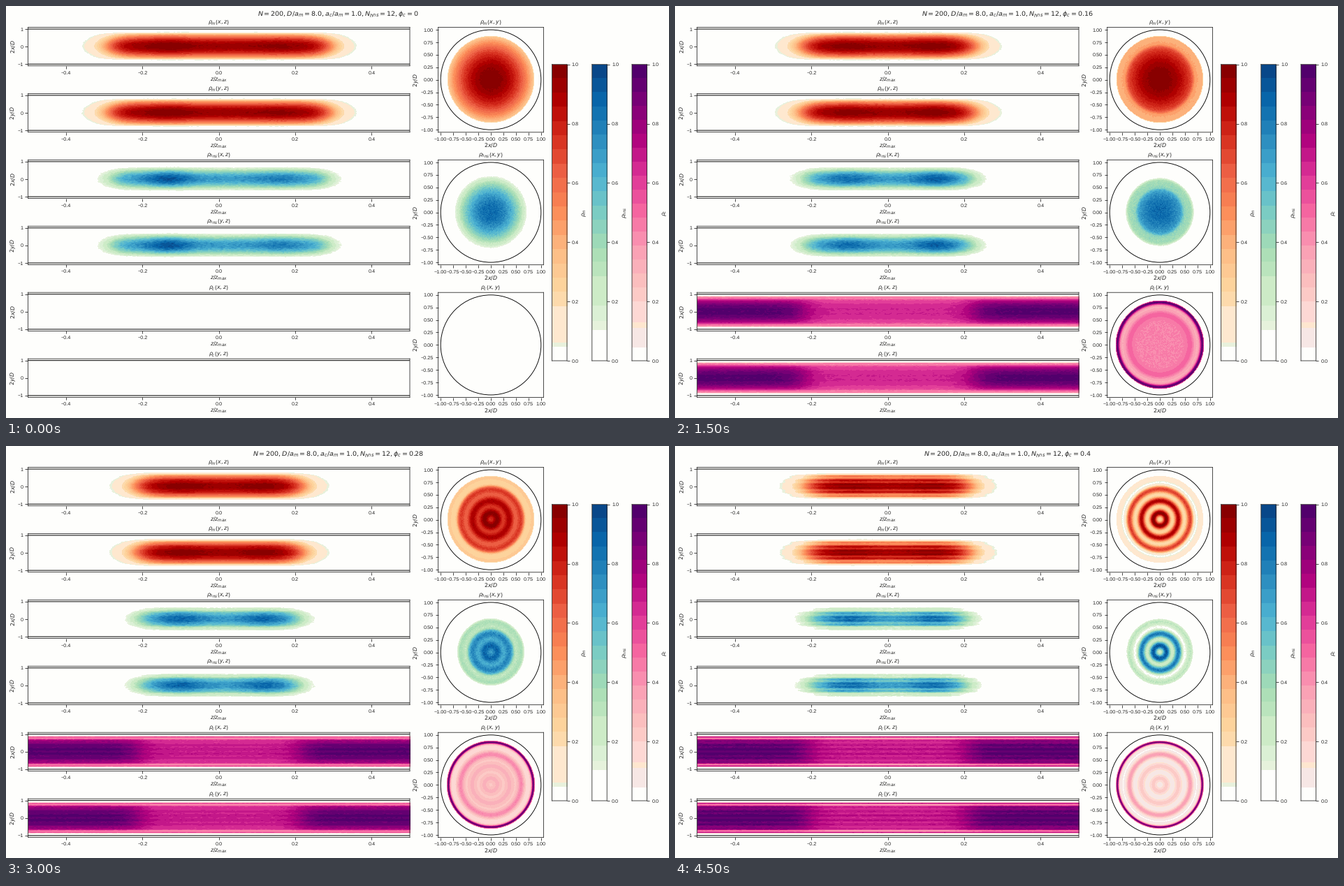
A matplotlib script that plays this animation: 949x590 px, repeating every 5000 ms.

```python
import numpy as np
import matplotlib as mpl
import matplotlib.pyplot as plt
from matplotlib.animation import FuncAnimation
from matplotlib.colors import ListedColormap

W, H, DPI = 949, 590, 64
PT = 59.3 / DPI          # keeps text and strokes in proportion to the stage
PAPER, INK = "#fefefc", "0.15"
STEPS = 10
SPECIES = ["m", "hns", "c"]

plt.rcParams.update({
    "font.family": "Liberation Sans", "mathtext.fontset": "dejavusans",
    "text.hinting": "none", "path.snap": False,
    "font.size": 9.6 * PT, "axes.labelsize": 9.6 * PT, "axes.titlesize": 9.6 * PT,
    "xtick.labelsize": 8.8 * PT, "ytick.labelsize": 8.8 * PT,
    "axes.linewidth": PT, "xtick.major.width": PT, "ytick.major.width": PT,
    "xtick.major.size": 4.8 * PT, "ytick.major.size": 4.8 * PT,
    "xtick.major.pad": 3.5 * PT, "ytick.major.pad": 3.5 * PT,
    "axes.labelpad": 0.5 * PT, "axes.titlepad": 6 * PT,
    "text.color": INK, "axes.labelcolor": INK, "xtick.color": INK,
    "ytick.color": INK, "axes.edgecolor": INK,
    "figure.facecolor": PAPER, "axes.facecolor": PAPER,
})


def banded(name, low, n):
    """Stepped colormap: a few given low bands, then n even bands up to 1."""
    base = mpl.colormaps[name]
    edges = np.linspace(low[-1][0], 1, n + 1)
    tops = [e for e, _ in low] + list(edges[1:])
    cols = [c for _, c in low] + [base(v) for v in (edges[1:] + edges[:-1]) / 2]
    v = (np.arange(1000) + 0.5) / 1000
    return ListedColormap([cols[i] for i in np.searchsorted(tops, v)])


CMAPS = {
    "m": banded("OrRd", [(0.047, PAPER), (0.061, "#e8f1dc"), (0.184, "#fee8cf")], 17),
    "hns": banded("GnBu", [(0.104, PAPER), (0.134, "#e6f2dc"), (0.185, "#dbf0d5"),
                           (0.285, "#cdebc7")], 15),
    "c": banded("RdPu", [(0.044, PAPER), (0.11, "#f7e7e5"), (0.13, "#fee6cf"),
                         (0.2, "#fdd8d4")], 17),
}


def centers(n, lim):
    return (np.arange(n) + 0.5) / n * 2 * lim - lim


AX = centers(140, 1)
RR = np.hypot(AX[:, None], AX[None, :])
Z = centers(200, 0.5)[None, :]
X = centers(56, 1)[:, None]


def bump(v, mid, width):
    return np.exp(-((v - mid) / width) ** 2)


def sigmoid(v):
    return 1 / (1 + np.exp(-np.clip(v, -40, 40)))


def mix(a, b, t):
    return a + (b - a) * t


def ramp(v, lo, hi):
    return np.clip((v - lo) / (hi - lo), 0, 1)


def crowding(k):
    return 0.04 * (k + 1) if k else 0


def half_length(phi):
    return 0.222 + 0.075 * np.exp(-phi / 0.09)


def layers(r, phi):
    """Concentric layers, 0.24 apart, that deepen with crowding."""
    depth = 0.6 * ramp(phi, 0.2, 0.4) ** 1.7
    return (1 + depth * np.cos(2 * np.pi * (r - 0.13) / 0.24)) / (1 + depth)


def radial(kind, phi):
    """Mean density in the x-y plane: a dome that turns into steps and layers."""
    r, order, late = RR, ramp(phi, 0, 0.2), ramp(phi, 0.2, 0.4)
    if kind == "m":
        step = sigmoid((r - 0.67) / 0.015)
        stepped = mix(1 - 0.75 * r ** 2, mix(0.41, 0.16, late), step)
        return mix(1 - 0.95 * r ** 2, stepped, order) * layers(r, phi) * (r < 0.86)
    if kind == "hns":
        dome = np.clip(1 - (r / 0.76) ** 2, 0, 1)
        step = sigmoid((r - 0.46) / 0.015)
        stepped = mix(1 - 1.1 * r ** 2, mix(0.46, 0.32, late), step)
        stepped = stepped * sigmoid((0.66 - r) / 0.012)
        return mix(0.87, 0.95, late) * mix(dome, stepped, order) * layers(r, phi)
    if phi == 0:
        return np.zeros_like(r)
    f = 0.88 * np.exp(-4.4 * phi) + 0.11 * order * bump(r, 0.6, 0.06)
    f = f * (1 - 0.3 * order * sigmoid((r - 0.68) / 0.02))
    f = f * mix(1, 1.5, late) * layers(r, phi)
    width = 0.022 + 0.07 * np.exp(-phi / 0.13)
    return mix(f, 0.97, bump(r, 0.845, width)) * (r < 0.875)


def along(kind, k, plane):
    """Mean density in a plane that holds the z axis."""
    phi, ax = crowding(k), np.abs(X)
    half = half_length(phi)
    if kind == "c":
        if phi == 0:
            return np.zeros((X.size, Z.size))
        packed = ramp(phi, 0.08, 0.4)
        chord = np.sqrt(np.clip(1 - (ax / 0.87) ** 2, 0, None))
        ends = chord ** mix(1, 0.5, packed)
        mid = 0.72 - 0.13 * np.exp((0.08 - phi) / 0.06)
        mid = mid * chord ** mix(0.5, 0.2, packed)
        inside = sigmoid((half - 0.01 - np.abs(Z) - 0.03 * X ** 2) / 0.02)
        f = mix(ends, mid, inside)
        f = f * (1 + 0.05 * packed * np.cos(2 * np.pi * (ax - 0.13) / 0.24))
        f = f + packed * (0.22 * bump(ax, 0.835, 0.03) - 0.28 * bump(ax, 0.73, 0.045))
        return 0.97 * f * (ax < 0.87)
    # Two dense spots whose balance swings and settles.
    skew = 0.4 * np.cos(1.2 * k) * np.exp(-k / 3)
    spots = ((1 + skew) * bump(Z, -0.45 * half, 0.06)
             + (1 - skew) * bump(Z, 0.53 * half, 0.06))
    line = plane.sum(axis=0)
    prof = np.interp(X, AX, line / line.max())
    if kind == "m":
        t = ramp(ax, 0.84, 0.65)
        ends = sigmoid((half - np.abs(Z) - 0.05 * X ** 2) / 0.021)
        return prof * t * t * (3 - 2 * t) * ends * (0.94 + 0.05 * spots)
    ends = sigmoid((half - 0.01 - np.abs(Z) - 0.05 * X ** 2) / 0.018)
    return prof * ends * (0.7 + 0.18 * spots)


GRAIN = {"m": (0.014, 0.013), "hns": (0.042, 0.04), "c": (0.005, 0.014)}


def grainy(f, size, rng):
    return np.clip(f + size * np.sqrt(np.clip(f, 0, 1)) * rng.standard_normal(f.shape), 0, 1)


def fields(k):
    out = []
    for s, kind in enumerate(SPECIES):
        rng = np.random.default_rng(100 * k + s)
        plane = radial(kind, crowding(k))
        side = along(kind, k, plane)
        flat, deep = GRAIN[kind]
        out += [grainy(side, deep, rng), grainy(side, deep, rng), grainy(plane, flat, rng)]
    return out


fig = plt.figure(figsize=(W / DPI, H / DPI), dpi=DPI)


def box(x0, y0, x1, y1):
    return fig.add_axes([x0 / W, 1 - y1 / H, (x1 - x0) / W, (y1 - y0) / H])


def picture(ax, kind, shape, extent):
    return ax.imshow(np.zeros(shape), extent=extent, origin="lower", aspect="auto",
                     cmap=CMAPS[kind], vmin=0, vmax=1, interpolation="bilinear",
                     interpolation_stage="data")


def side_panel(kind, row, axis):
    top = 30.5 + 94.93 * row
    ax = box(31.5, top, 578, top + 55.2)
    im = picture(ax, kind, (X.size, Z.size), (-0.5, 0.5, -1, 1))
    for y in (-1, 1):
        ax.axhline(y, color="black", lw=1.2 * PT)
    ax.set(xlim=(-0.5, 0.5), ylim=(-1.1, 1.1), yticks=[-1, 0, 1],
           xticks=[-0.4, -0.2, 0, 0.2, 0.4], xlabel=r"$z/z_{max}$",
           ylabel=rf"$2{axis}/D$", title=rf"$\rho_{{{kind}}}({axis},z)$")
    return im


def cross_panel(kind, row):
    top = 30.5 + 94.93 * row
    ax = box(618.6, top, 769.4, top + 150.3)
    im = picture(ax, kind, RR.shape, (-1, 1, -1, 1))
    ax.add_patch(plt.Circle((0, 0), 1, fill=False, ec="black", lw=1.1 * PT))
    ticks = np.arange(-4, 5) / 4
    ax.set(xlim=(-1.05, 1.05), ylim=(-1.05, 1.05), xticks=ticks, yticks=ticks,
           xlabel=r"$2x/D$", ylabel=r"$2y/D$", title=rf"$\rho_{{{kind}}}(x,y)$")
    return im


def color_scale(kind, x):
    ax = box(x, 83.7, x + 21.4, 508)
    ax.imshow((np.arange(1000)[:, None] + 0.5) / 1000, extent=(0, 1, 0, 1),
              origin="lower", aspect="auto", cmap=CMAPS[kind], vmin=0, vmax=1,
              interpolation="nearest")
    ax.yaxis.tick_right()
    ax.yaxis.set_label_position("right")
    ax.set(xticks=[], yticks=np.arange(6) / 5)
    ax.set_ylabel(rf"$\rho_{{{kind}}}$", labelpad=4 * PT)


images = []
for s, kind in enumerate(SPECIES):
    images += [side_panel(kind, 2 * s, "x"), side_panel(kind, 2 * s + 1, "y"),
               cross_panel(kind, 2 * s)]
    color_scale(kind, 781.6 + 57.2 * s)

heading = fig.text(475.5 / W, 1 - 11.7 / H, "", ha="center", va="center",
                   fontsize=11.52 * PT)


def draw(k):
    for im, data in zip(images, fields(k)):
        im.set_data(data)
    heading.set_text(rf"$N=200,D/a_m=8.0,a_c/a_m=1.0,N_{{hns}}=12,\phi_c={crowding(k):g}$")
    return images + [heading]


anim = FuncAnimation(fig, draw, frames=STEPS, init_func=lambda: draw(0),
                     interval=500, repeat=True, repeat_delay=0, blit=False)
plt.show()
```
